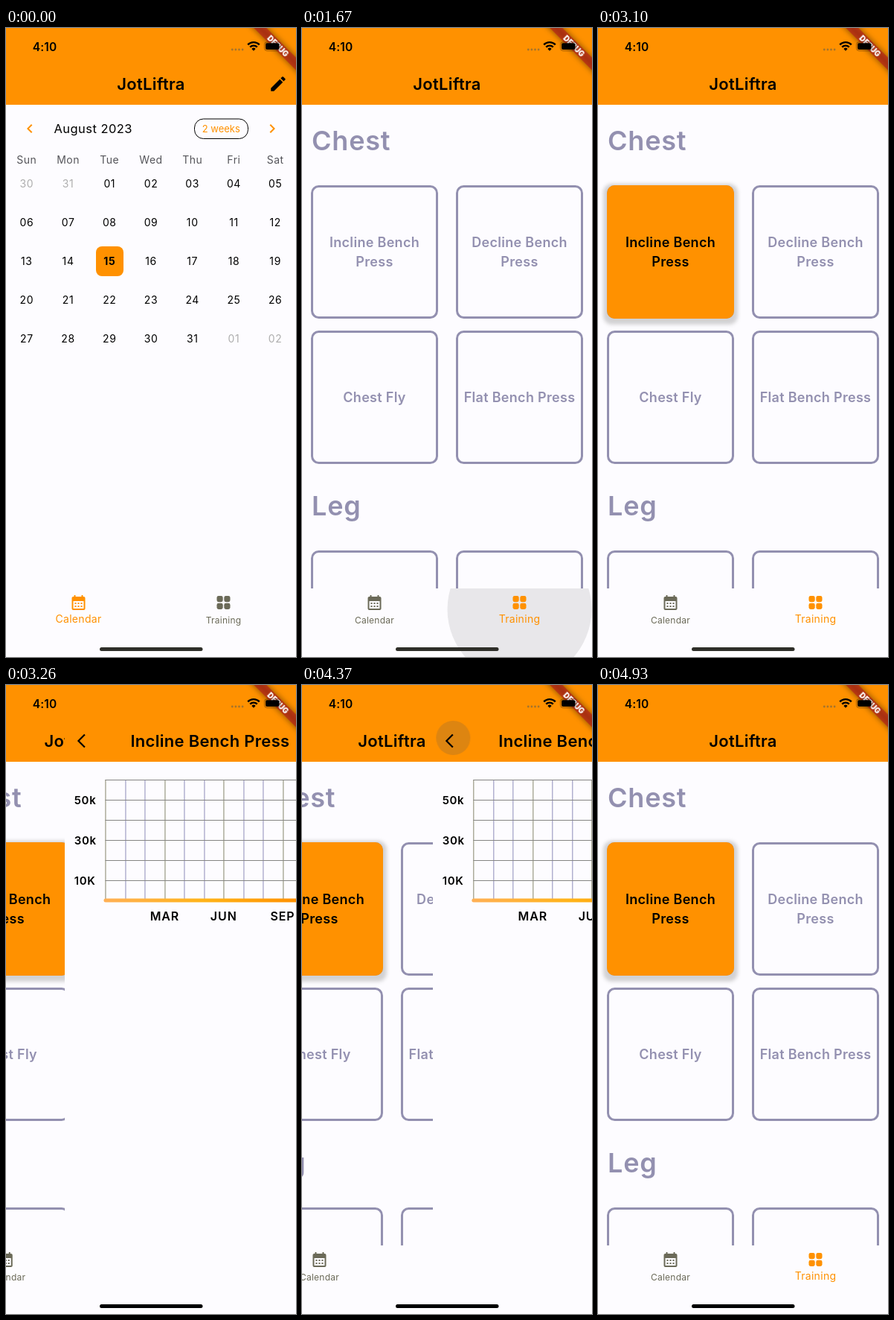
Write an HTML page that moves like this. It is 390 px wide and 844 px high and loops after 5.01 s.

```html
<!DOCTYPE html>
<html lang="en">
<head>
<meta charset="utf-8">
<title>Workout tracker</title>
<style>
  :root { --accent: #ff9100; --paper: #fdfcff; --lilac: #9390b0; --muted: #6b6a58; }
  html, body { margin: 0; width: 100%; height: 100%; overflow: hidden; background: var(--paper); }
  svg { display: block; width: 390px; height: 844px; }
  text { font-family: Inter, "Open Sans", sans-serif; font-size: 14px; letter-spacing: .3px; }
  .mid { text-anchor: middle; }
  .paper { fill: var(--paper); }
  .accent { fill: var(--accent); }
  .title { font-size: 22px; font-weight: 600; }
  .day { letter-spacing: .6px; }
  .week { letter-spacing: .5px; fill: #55555a; }
  .out { fill: #aeaeae; }
  .month { font-size: 16.5px; letter-spacing: .45px; }
  .pill { font-size: 13px; letter-spacing: 0; fill: var(--accent); }
  .group { font-size: 36px; font-weight: 600; letter-spacing: .8px; fill: var(--lilac); }
  .card rect { fill: none; stroke: var(--lilac); stroke-width: 3; }
  .card text { font-size: 18px; font-weight: 600; fill: var(--lilac); }
  .picked rect { fill: var(--accent); stroke: var(--accent); }
  .picked text { fill: #000; }
  .picked .glow { fill: #9e9e9e; stroke: none; opacity: .45; filter: blur(2.5px); }
  .axis { font-size: 15px; font-weight: 600; letter-spacing: .7px; }
  .axis.mid { font-size: 16px; letter-spacing: .9px; }
  .tab { fill: currentColor; }
  .clock { font-size: 15.5px; font-weight: 600; letter-spacing: .2px; }
  .flag { font-size: 10.2px; font-weight: 900; letter-spacing: 0; fill: #fff; }

  /* All timelines share one loop; the script below moves their clock. */
  .home, .detail, .calendar, .training, .picked, .tab, .tab text, .ripple, .press, .bar {
    animation: 5010ms linear infinite paused;
  }
  .calendar { animation-name: leave; animation-timing-function: step-end; }
  .training { animation-name: enter; animation-timing-function: step-end; }
  .picked { animation-name: pick; animation-timing-function: step-end; }
  .bar { animation-name: darken; animation-timing-function: step-end; }
  .home { animation-name: under; }
  .detail { animation-name: over; }
  .tab.a { animation-name: dim; }
  .tab.b { animation-name: light; }
  .tab.a text { animation-name: shrink; transform-origin: 97.5px 804px; }
  .tab.b text { animation-name: grow; transform-origin: 292.5px 804px; }
  .ripple { animation-name: ripple; transform-origin: 292.5px 780px; }
  .press { animation-name: press; }

  @keyframes leave { 0% { visibility: visible } 28.5%, 100% { visibility: hidden } }
  @keyframes enter { 0% { visibility: hidden } 28.5%, 100% { visibility: visible } }
  @keyframes pick { 0% { visibility: hidden } 61.8%, 100% { visibility: visible } }
  @keyframes darken { 0% { fill: #2f2f29 } 63.4%, 100% { fill: #000 } }
  @keyframes dim {
    0%, 28.5% { color: var(--accent); animation-timing-function: cubic-bezier(.4,0,.2,1) }
    32.5%, 100% { color: var(--muted) }
  }
  @keyframes light {
    0%, 28.5% { color: var(--muted); animation-timing-function: cubic-bezier(.4,0,.2,1) }
    32.5%, 100% { color: var(--accent) }
  }
  @keyframes shrink {
    0%, 28.5% { transform: scale(1); animation-timing-function: cubic-bezier(.4,0,.2,1) }
    32.5%, 100% { transform: scale(.857) }
  }
  @keyframes grow {
    0%, 28.5% { transform: scale(.857); animation-timing-function: cubic-bezier(.4,0,.2,1) }
    32.5%, 100% { transform: scale(1) }
  }
  @keyframes ripple {
    0%, 26.95% { opacity: 0; transform: scale(.2) }
    28.5% { opacity: .09; transform: scale(.45) }
    33% { opacity: .09; transform: scale(1) }
    38.5%, 100% { opacity: 0; transform: scale(1) }
  }
  @keyframes press {
    0%, 85.4% { opacity: 0 }
    85.6%, 88% { opacity: .2 }
    94%, 100% { opacity: 0 }
  }
  @keyframes over {
    0%, 61.876% { transform: translateX(390px); animation-timing-function: cubic-bezier(.283,.044,.545,.57) }
    63.852% { transform: translateX(179px); animation-timing-function: cubic-bezier(.209,1,.435,.976) }
    71.6%, 85.569% { transform: translateX(0); animation-timing-function: cubic-bezier(.283,.044,.545,.57) }
    87.545% { transform: translateX(211px); animation-timing-function: cubic-bezier(.209,1,.435,.976) }
    95.549%, 100% { transform: translateX(390px) }
  }
  @keyframes under {
    0%, 61.876% { transform: translateX(0); animation-timing-function: cubic-bezier(.35,.91,.33,.97) }
    71.856%, 85.569% { transform: translateX(-130px); animation-timing-function: cubic-bezier(.35,.91,.33,.97) }
    95.549%, 100% { transform: translateX(0) }
  }
</style>
</head>
<body>
<svg viewBox="0 0 390 844">
  <defs>
    <linearGradient id="trend">
      <stop offset="0" stop-color="#ffb055"/>
      <stop offset=".42" stop-color="#ffb318"/>
      <stop offset=".8" stop-color="#ff9100"/>
    </linearGradient>
    <clipPath id="tabs"><rect x="195" y="752" width="195" height="92"/></clipPath>
  </defs>

  <g class="home">
    <rect class="paper" width="390" height="844"/>
    <g class="training" id="training"></g>
    <rect class="accent" width="390" height="103"/>
    <text class="title mid" x="195" y="83">JotLiftra</text>
    <g class="calendar" id="calendar">
      <path transform="translate(353 62) scale(1.083)" d="M3 17.25V21h3.75L17.81 9.94l-3.75-3.75L3 17.25zM20.71 7.04a1 1 0 0 0 0-1.41l-2.34-2.34a1 1 0 0 0-1.41 0l-1.83 1.83 3.75 3.75 1.83-1.83z"/>
      <path class="accent" transform="translate(20 123)" d="M15.41 7.41L14 6l-6 6 6 6 1.41-1.41L10.83 12z"/>
      <path class="accent" transform="translate(370 123) scale(-1 1)" d="M15.41 7.41L14 6l-6 6 6 6 1.41-1.41L10.83 12z"/>
      <text class="month" x="64.5" y="141">August 2023</text>
      <rect x="253.5" y="122" width="72" height="26.5" rx="12" fill="none" stroke="#000"/>
      <text class="pill mid" x="289.3" y="140">2 weeks</text>
      <rect class="accent" x="121" y="293" width="37" height="40" rx="8"/>
    </g>
    <rect class="paper" y="752" width="390" height="92"/>
    <g clip-path="url(#tabs)"><circle class="ripple" cx="292.5" cy="780" r="97"/></g>
    <g class="tab a">
      <path transform="translate(85.5 759)" d="M19 4h-1V2h-2v2H8V2H6v2H5c-1.11 0-1.99.9-1.99 2L3 20a2 2 0 0 0 2 2h14c1.1 0 2-.9 2-2V6c0-1.1-.9-2-2-2zm0 16H5V10h14v10zM9 14H7v-2h2v2zm4 0h-2v-2h2v2zm4 0h-2v-2h2v2zm-8 4H7v-2h2v2zm4 0h-2v-2h2v2zm4 0h-2v-2h2v2z"/>
      <text class="mid" x="97.5" y="798">Calendar</text>
    </g>
    <g class="tab b">
      <rect x="283.5" y="762" width="8.2" height="8.2" rx="2.4"/>
      <rect x="293.3" y="762" width="8.2" height="8.2" rx="2.4"/>
      <rect x="283.5" y="771.8" width="8.2" height="8.2" rx="2.4"/>
      <rect x="293.3" y="771.8" width="8.2" height="8.2" rx="2.4"/>
      <text class="mid" x="292.5" y="798">Training</text>
    </g>
  </g>

  <g class="detail">
    <rect class="paper" width="390" height="844"/>
    <rect class="accent" width="390" height="103"/>
    <circle class="press" cx="27" cy="71" r="23" fill="#555"/>
    <path d="M26.5 66.5L18 75l8.5 8.5" fill="none" stroke="#000" stroke-width="2.2"/>
    <text class="title mid" x="195" y="83">Incline Bench Press</text>
    <g id="chart"></g>
    <rect x="52" y="286.5" width="322" height="5" rx="2.5" fill="url(#trend)"/>
  </g>

  <g transform="translate(390 0) rotate(45)">
    <rect x="-50" y="28" width="100" height="12" opacity=".5" style="filter:blur(4px)"/>
    <rect x="-50" y="28" width="100" height="12" fill="#b71c1c" opacity=".63"/>
    <text class="flag mid" x="0" y="37.7">DEBUG</text>
  </g>

  <text class="clock" x="35.7" y="30.6">4:10</text>
  <path d="M304.3 29h15" stroke="#a5742c" stroke-width="2.8" stroke-linecap="round" stroke-dasharray="0 4.6"/>
  <g fill="none" stroke="#000" stroke-width="2.4">
    <path d="M325.2 22.4a11 11 0 0 1 15.6 0"/>
    <path d="M328.2 25.6a6.8 6.8 0 0 1 9.6 0"/>
  </g>
  <path d="M333 30.8l-2.6-2.9a3.7 3.7 0 0 1 5.2 0z"/>
  <rect x="347.5" y="18.8" width="21.5" height="11.8" rx="3.5" fill="none" stroke="#000" opacity=".35"/>
  <rect x="349" y="20.3" width="18.5" height="8.8" rx="2"/>
  <rect class="bar" x="126" y="831" width="138.5" height="5" rx="2.5"/>
</svg>

<script>
  const add = (id, html) => document.getElementById(id).insertAdjacentHTML('beforeend', html);
  const label = (cls, x, y, str, attrs = '') => `<text class="${cls}" x="${x}" y="${y}" ${attrs}>${str}</text>`;

  // Month grid: five weeks beginning on 30 July
  const colX = i => 390 / 7 * (i + .5);
  'Sun Mon Tue Wed Thu Fri Sat'.split(' ')
    .forEach((name, i) => add('calendar', label('week mid', colX(i), 182, name)));
  for (let i = 0; i < 35; i++) {
    const date = new Date(2023, 6, 30 + i);
    const day = date.getDate();
    const cls = 'day mid' + (date.getMonth() === 7 ? '' : ' out');
    const bold = cls === 'day mid' && day === 15 ? 'font-weight="700"' : '';
    add('calendar', label(cls, colX(i % 7), 214 + 52 * Math.floor(i / 7), String(day).padStart(2, '0'), bold));
  }

  // Exercise cards
  const card = (x, y, lines, cls = '') => {
    const first = y + 96 - 13 * lines.length;
    const glow = cls ? `<rect class="glow" x="${x - 5}" y="${y - 2}" width="181" height="189" rx="12"/>` : '';
    const words = lines.map((line, i) => label('mid', x + 85.5, first + 12.5 + 26 * i, line));
    return `<g class="card ${cls}">${glow}<rect x="${x + 1.5}" y="${y + 1.5}" width="168" height="176" rx="9"/>${words.join('')}</g>`;
  };
  add('training',
    label('group', 13, 164, 'Chest') + label('group', 13, 654, 'Leg') +
    card(12, 211, ['Incline Bench', 'Press']) +
    card(207, 211, ['Decline Bench', 'Press']) +
    card(12, 406, ['Chest Fly']) +
    card(207, 406, ['Flat Bench Press']) +
    card(12, 701, []) + card(207, 701, []));
  add('training', card(12, 211, ['Incline Bench', 'Press'], 'picked'));

  // Yearly chart
  const rule = (d, color) => `<path d="${d}" stroke="${color}" stroke-width="1"/>`;
  for (let i = 0; i <= 12; i++) add('chart', rule(`M${Math.round(54 + 26.5 * i) + .5} 127v162`, i % 3 ? '#8d8bb8' : '#85856a'));
  for (let i = 0; i <= 6; i++) add('chart', rule(`M54 ${127.5 + 27 * i}h318`, '#858583'));
  ['50k', '30k', '10K'].forEach((str, i) => add('chart', label('axis', 12.3, 160.3 + 54 * i, str)));
  ['MAR', 'JUN', 'SEP'].forEach((str, i) => add('chart', label('axis mid', 134 + 79.3 * i, 315.7, str)));

  // Advance in 80 ms ticks counted from each tap
  const LOOP = 5010, TICK = 80, TAPS = [1350, 3100, 4290];
  const snap = t => {
    const tap = TAPS.filter(s => s <= t).pop();
    return tap ? tap + Math.floor((t - tap) / TICK) * TICK : 0;
  };
  const timelines = document.getAnimations();
  const start = performance.now();
  const draw = () => {
    const t = snap((performance.now() - start) % LOOP);
    timelines.forEach(a => { a.currentTime = t; });
    requestAnimationFrame(draw);
  };
  draw();
</script>
</body>
</html>
```
